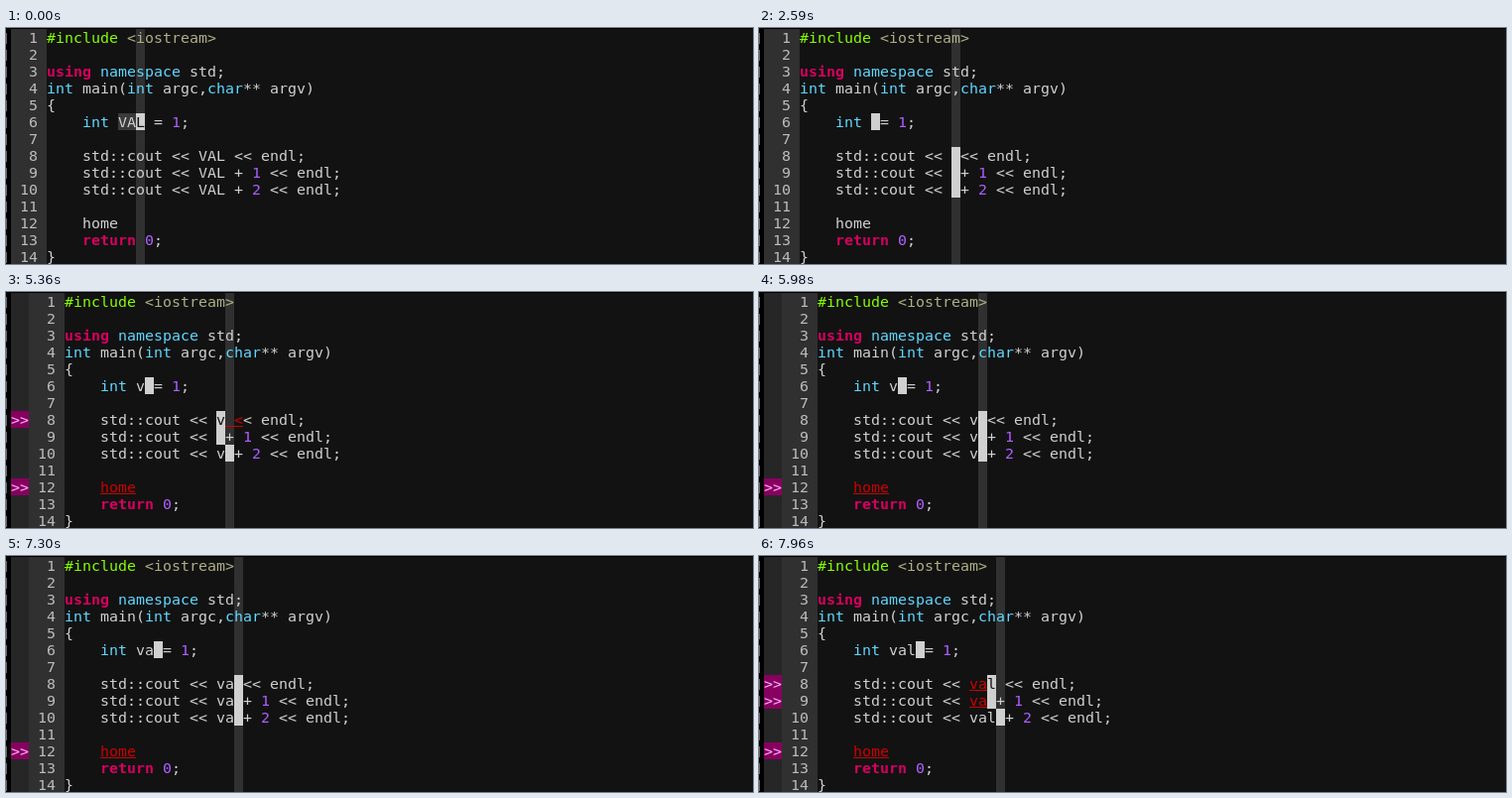
These frames come from a looping animation (753x238 px, 8 s). An HTML page:

```html
<!DOCTYPE html>
<html lang="en">
<head>
<meta charset="utf-8">
<title>Editing with several cursors</title>
<style>
  html, body { margin: 0; width: 100%; height: 100%; overflow: hidden; background: #000; }
  #edge { position: absolute; left: 0; top: 1px; width: 1px; height: 237px;
    background: repeating-linear-gradient(#000 0 4px, #6b6670 4px 15px, #000 15px 17px); }
  #screen { position: absolute; left: 5px; top: 1px; right: 0; height: 237px; overflow: hidden;
    background: #121212; color: #d0d0d0;
    font: 14.95px/18px "DejaVu Sans Mono", monospace; font-variant-ligatures: none; }
  .row { position: absolute; left: 0; width: 100%; height: 17px; }
  .row span { position: absolute; top: 0; height: 17px; white-space: pre; overflow: hidden; }
  .num { color: #bcbcbc; background: #303030; }
  .gap { background: #262626; }
  .sign { color: #ffafff; background: #87005f; }
  .pre { color: #87ff00; }
  .str { color: #afaf87; }
  .key { color: #d7005f; font-weight: bold; }
  .type { color: #5fd7ff; }
  .val { color: #af5fff; }
  .err { color: #cc0000; text-decoration: underline; text-decoration-skip-ink: none; }
  .col { background: #303030; }
  .sel { background: #3a3a3a; }
  .row .cur { color: #121212; background: #d0d0d0; }
  .term { background: #bcbcbc; }
</style>
</head>
<body>
<div id="edge"></div>
<div id="screen"></div>
<script>
const LOOP = 8000, CELL = 9, ROW = 17;

// @ marks the edited name
const CODE = [
  '#include <iostream>', '', 'using namespace std;', 'int main(int argc,char** argv)', '{',
  '    int @ = 1;', '', '    std::cout << @ << endl;', '    std::cout << @ + 1 << endl;',
  '    std::cout << @ + 2 << endl;', '', '    home', '    return 0;', '}'
];
const RULES = [
  ['pre', /#include/g], ['str', /<iostream>/g], ['key', /\b(using|return)\b/g],
  ['type', /\b(namespace|int|char)\b/g], ['val', /\b\d\b/g]
];
const HOME = { 12: [4, 4] };

// name: text per line; at: cursor offset in it; err: [column, length] per line
const STEPS = [
  [0, { name: { 6: 'VAL', 8: 'VAL', 9: 'VAL', 10: 'VAL' }, at: { 6: 2 }, sel: true,
        col: 10, signs: [], err: {}, wide: false }],
  [260, { at: { 8: 2 }, col: 19 }],
  [690, { at: { 9: 2 } }],
  [1260, { at: { 10: 2 } }],
  [2590, { name: { 6: '', 8: '', 9: '', 10: '' }, at: { 6: 0, 8: 0, 9: 0, 10: 0 }, sel: false, col: 17 }],
  [4840, { name: { 10: 'v' }, at: { 10: 1 }, col: 18, wide: true, stale: true }],
  [4940, { stale: false, signs: [8, 10, 12], err: { ...HOME, 8: [18, 2], 10: [17, 1] } }],
  [5140, { name: { 6: 'v' }, at: { 6: 1 }, col: 9 }],
  [5250, { signs: [8, 12], err: { ...HOME, 8: [18, 2] } }],
  [5360, { name: { 8: 'v' }, col: 18 }],
  [5580, { at: { 8: 1 }, signs: [12], err: HOME }],
  [5680, { name: { 9: 'v' } }],
  [5980, { at: { 9: 1 } }],
  [6320, { name: { 10: 'va' }, at: { 10: 2 }, col: 19, signs: [10, 12], err: { ...HOME, 10: [17, 2] } }],
  [6540, { name: { 6: 'va' }, at: { 6: 2 }, col: 10, signs: [8, 9, 12], term: 10 }],
  [6570, { name: { 8: 'va' }, col: 19, signs: [9, 12], err: { ...HOME, 9: [17, 1] }, term: 0 }],
  [6770, { name: { 9: 'va' }, at: { 8: 2 } }],
  [7200, { signs: [12], err: HOME }],
  [7300, { at: { 9: 2 } }],
  [7500, { name: { 10: 'val' }, at: { 10: 3 }, col: 20 }],
  [7590, { signs: [10, 12], err: { ...HOME, 10: [17, 2] } }],
  [7680, { name: { 6: 'val' }, at: { 6: 3 }, col: 11 }],
  [7780, { signs: [8, 9, 12], err: { ...HOME, 8: [17, 2], 9: [17, 2] } }],
  [7920, { col: 20 }],
  [7960, { name: { 8: 'val' } }]
];

let last = {};
const states = STEPS.map(([time, change]) => last = {
  ...last, ...change, time,
  name: { ...last.name, ...change.name },
  at: { ...last.at, ...change.at }
});

function gutter(n, s, wide) {
  const cells = [...(String(n).padStart(3) + ' ')].map(ch => ({ ch, cls: 'num' }));
  if (s.term === n) cells[0].cls = 'term';
  if (!wide) return cells;
  const on = s.signs.includes(n);
  const mark = { ch: on ? '>' : ' ', cls: on ? 'sign' : 'gap' };
  return [mark, mark, ...cells];
}

function codeCells(n, s, col) {
  const src = CODE[n - 1], start = src.indexOf('@');
  const text = src.replace('@', s.name[n] ?? '');
  const cells = [...text.padEnd(col + 1)].map(ch => ({ ch, cls: '' }));
  const paint = (from, len, cls) => cells.slice(from, from + len).forEach(c => c.cls = cls);
  for (const [cls, re] of RULES)
    for (const m of text.matchAll(re)) paint(m.index, m[0].length, cls);
  if (s.err[n]) paint(...s.err[n], 'err');
  cells[col].cls += ' col';
  if (n in s.at) {
    if (s.sel) paint(start, s.at[n], 'sel');
    paint(start + s.at[n], 1, 'cur');
  }
  return cells;
}

const rows = CODE.map((_, i) => {
  const row = document.createElement('div');
  row.className = 'row';
  row.style.top = i * ROW + 'px';
  document.getElementById('screen').append(row);
  return row;
});

function fillRow(row, cells) {
  const spans = [];
  for (let i = 0, j; i < cells.length; i = j) {
    for (j = i + 1; j < cells.length && cells[j].cls === cells[i].cls;) j++;
    const span = document.createElement('span');
    span.className = cells[i].cls;
    span.textContent = cells.slice(i, j).map(c => c.ch).join('');
    span.style.left = i * CELL + 'px';
    span.style.width = (j - i) * CELL + 'px';
    spans.push(span);
  }
  row.replaceChildren(...spans);
}

function draw(s) {
  rows.forEach((row, i) => {
    const n = i + 1, old = s.stale && n === 14;
    fillRow(row, [...gutter(n, s, s.wide && !old), ...codeCells(n, s, old ? 17 : s.col)]);
  });
}

const begin = performance.now();
let shown;
function tick() {
  const t = (performance.now() - begin) % LOOP;
  const s = states.findLast(x => x.time <= t);
  if (s !== shown) draw(shown = s);
  requestAnimationFrame(tick);
}
tick();
</script>
</body>
</html>
```
